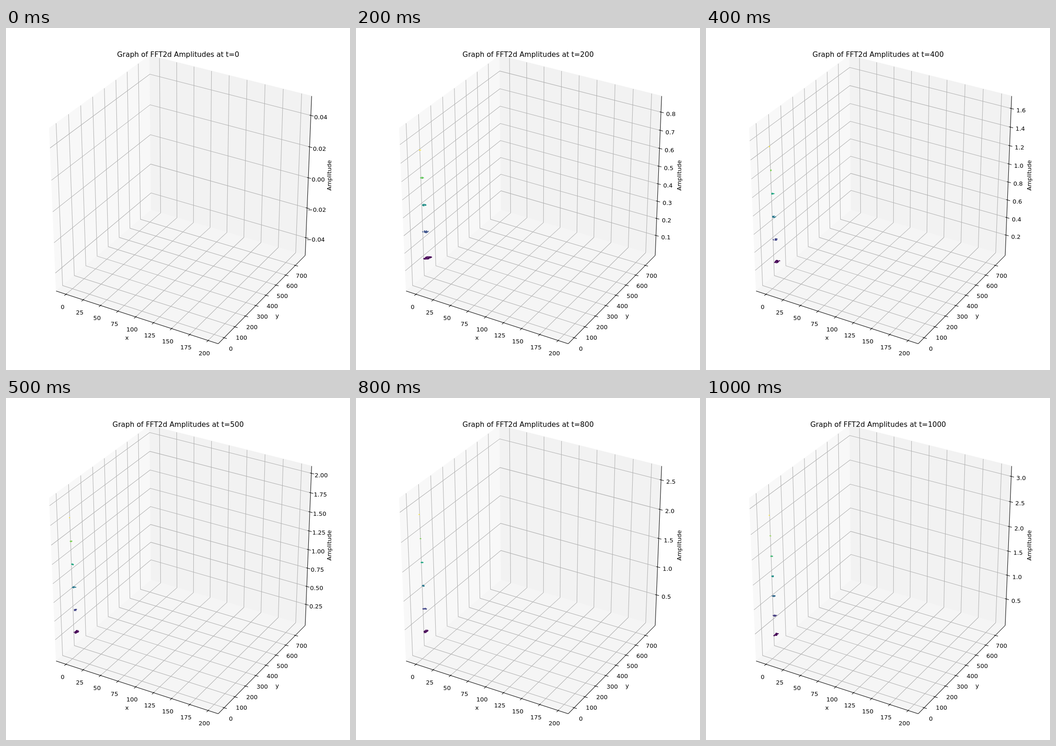
An HTML page with a canvas that plays this animation: 751 by 746 pixels, repeating every 1100 ms.

```html
<!DOCTYPE html>
<html>
<head>
<meta charset="utf-8">
<style>
html, body { margin: 0; width: 100%; height: 100%; overflow: hidden; background: #fff; }
canvas { display: block; }
</style>
</head>
<body>
<canvas id="stage" width="751" height="746"></canvas>
<script>
const ctx = document.getElementById('stage').getContext('2d');
const FONT = '"DejaVu Sans", Verdana, sans-serif';
const PAD = 1 / 48; // panes reach this far beyond the data limits
const PEAKS = [0, .45, .869, 1.255, 1.695, 2.05, 2.387, 2.55, 2.675, 2.9, 3.137];
const VIRIDIS = [[68, 1, 84], [65, 68, 135], [42, 120, 142], [34, 168, 132], [122, 209, 81], [253, 231, 37]];

// Perspective view of the unit cube: elevation 30, azimuth -60, distance 10
function project(x, y, z) {
  const [a, b, c] = [x, y, z].map(v => (v - .5) * (1 + 2 * PAD));
  const depth = 10 - (.4330 * a - .75 * b + .5 * c);
  return [
    385.7 + 3920 * (.8660 * a + .5 * b) / depth,
    363.2 - 3892 * (-.25 * a + .4330 * b + .8660 * c) / depth
  ];
}

const fraction = (v, lo, hi) => ((v - lo) / (hi - lo) + PAD) / (1 + 2 * PAD);
const xAt = v => fraction(v, -9.95, 208.95);
const yAt = v => fraction(v, -37.45, 786.45);

function path(points, color, fill) {
  ctx.beginPath();
  points.forEach(p => ctx.lineTo(...project(...p)));
  if (fill) {
    ctx.closePath();
    ctx.fillStyle = color;
    ctx.fill();
  }
  ctx.strokeStyle = color;
  ctx.lineWidth = 1.04;
  ctx.stroke();
}

// Text centred on x, with its digits centred on y
function label(text, x, y, size = 12.95) {
  ctx.font = size + 'px ' + FONT;
  ctx.textAlign = 'center';
  ctx.fillStyle = '#000';
  ctx.fillText(text, x, y + size * .365);
}

function niceStep(range, bins, steps) {
  for (let unit = .001; ; unit *= 10)
    for (const s of steps) if (range / (s * unit) <= bins + 1e-6) return s * unit;
}

function range(from, to, step) {
  const out = [];
  for (let i = Math.floor(from / step) + 1; i * step <= to + 1e-9; i++) out.push(i * step);
  return out;
}

function random(seed) {
  return () => {
    seed = (seed * 1664525 + 1013904223) % 4294967296;
    return seed / 4294967296;
  };
}

function viridis(u) {
  const i = Math.min(4, Math.floor(u * 5)), f = u * 5 - i;
  return `rgb(${VIRIDIS[i].map((c, k) => Math.round(c + (VIRIDIS[i + 1][k] - c) * f))})`;
}

// One speckled patch per contour level, narrowing towards the peak
function drawContours(time, peak) {
  const step = niceStep(peak, 8, [1, 1.5, 2, 2.5, 3, 4, 5, 6, 8]);
  const levels = range(0, peak, step);
  const spread = 11 + 11 * Math.exp((200 - time) / 250);
  levels.forEach((z, k) => {
    const f = z / peak;
    const width = 1 + spread * (1 - f) ** .9;
    const height = k ? Math.min(4.5, width * .35) : 6;
    const [left, mid] = project(xAt(-.8), yAt(17), fraction(z, 0, peak));
    const rnd = random(time * 7 + k * 131 + 5);
    ctx.fillStyle = viridis(k / (levels.length - 1));
    const count = Math.round(width * (k ? 2 : 3));
    const size = width < 5 ? 1.2 : 1.7;
    for (let i = 0; i < count; i++) {
      const u = (rnd() + rnd()) / 2;
      const rise = Math.sin(u * Math.PI) * height * (rnd() - .5);
      const tilt = k ? 0 : (.4 - u) * 4;
      ctx.fillRect(left + u * width - f, mid + rise + tilt - .7, size, size);
    }
  });
}

function draw(index) {
  const time = index * 100, peak = PEAKS[index];
  const lo = index ? 0 : -.05, hi = index ? peak : .05;
  const inside = .008, outside = .016;

  ctx.fillStyle = '#fff';
  ctx.fillRect(0, 0, 751, 746);
  path([[0, 0, 0], [0, 1, 0], [0, 1, 1], [0, 0, 1]], '#f8f8f8', true);
  path([[0, 1, 0], [1, 1, 0], [1, 1, 1], [0, 1, 1]], '#f2f2f2', true);
  path([[0, 0, 0], [1, 0, 0], [1, 1, 0], [0, 1, 0]], '#f5f5f5', true);

  const xs = range(-1, 200, 25), ys = range(-1, 700, 100);
  const step = niceStep(hi - lo, 9, [1, 2, 2.5, 5]);
  const zs = range(lo, hi, step);
  const digits = Math.abs(step * 10 - Math.round(step * 10)) < 1e-6 ? 1 : 2;
  const grid = '#b0b0b0';
  xs.map(xAt).forEach(x => path([[x, 0, 0], [x, 1, 0], [x, 1, 1]], grid));
  ys.map(yAt).forEach(y => path([[1, y, 0], [0, y, 0], [0, y, 1]], grid));
  zs.forEach(v => {
    const z = fraction(v, lo, hi);
    path([[0, 0, z], [0, 1, z], [1, 1, z]], grid);
  });

  path([[0, 0, 0], [1, 0, 0]], '#000');
  path([[1, 0, 0], [1, 1, 0]], '#000');
  path([[1, 1, 0], [1, 1, 1]], '#000');

  xs.forEach(v => {
    const x = xAt(v), [px, py] = project(x, 0, 0);
    path([[x, inside, 0], [x, -outside, 0]], '#000');
    label(v, px - 7.2 - 1.4 * x, py + 27.2);
  });
  ys.forEach(v => {
    const y = yAt(v), [px, py] = project(1, y, 0);
    path([[1 - inside, y, 0], [1 + outside, y, 0]], '#000');
    label(v, px + 14.7 - 1.5 * y, py + 23.8 - y);
  });
  zs.forEach(v => {
    const z = fraction(v, lo, hi), [px, py] = project(1, 1, z);
    path([[1 - inside, 1, z], [1 + outside, 1, z]], '#000');
    const text = Math.abs(v).toFixed(digits);
    label((v < -1e-9 ? '\u2212' : '') + text, px + 21.5, py + 3.5);
  });

  if (index) drawContours(time, peak);

  label('x', 264, 675.5);
  label('y', 592, 627.5);
  ctx.save();
  ctx.translate(705, 321.5);
  ctx.rotate(-Math.PI / 2);
  label('Amplitude', 0, 0);
  ctx.restore();
  label('Graph of FFT2d Amplitudes at t=' + time, 375.8, 57, 15.55);
}

const start = performance.now();
function tick() {
  const elapsed = Math.max(0, performance.now() - start);
  draw(Math.floor(elapsed / 100) % PEAKS.length);
  requestAnimationFrame(tick);
}
tick();
</script>
</body>
</html>
```
